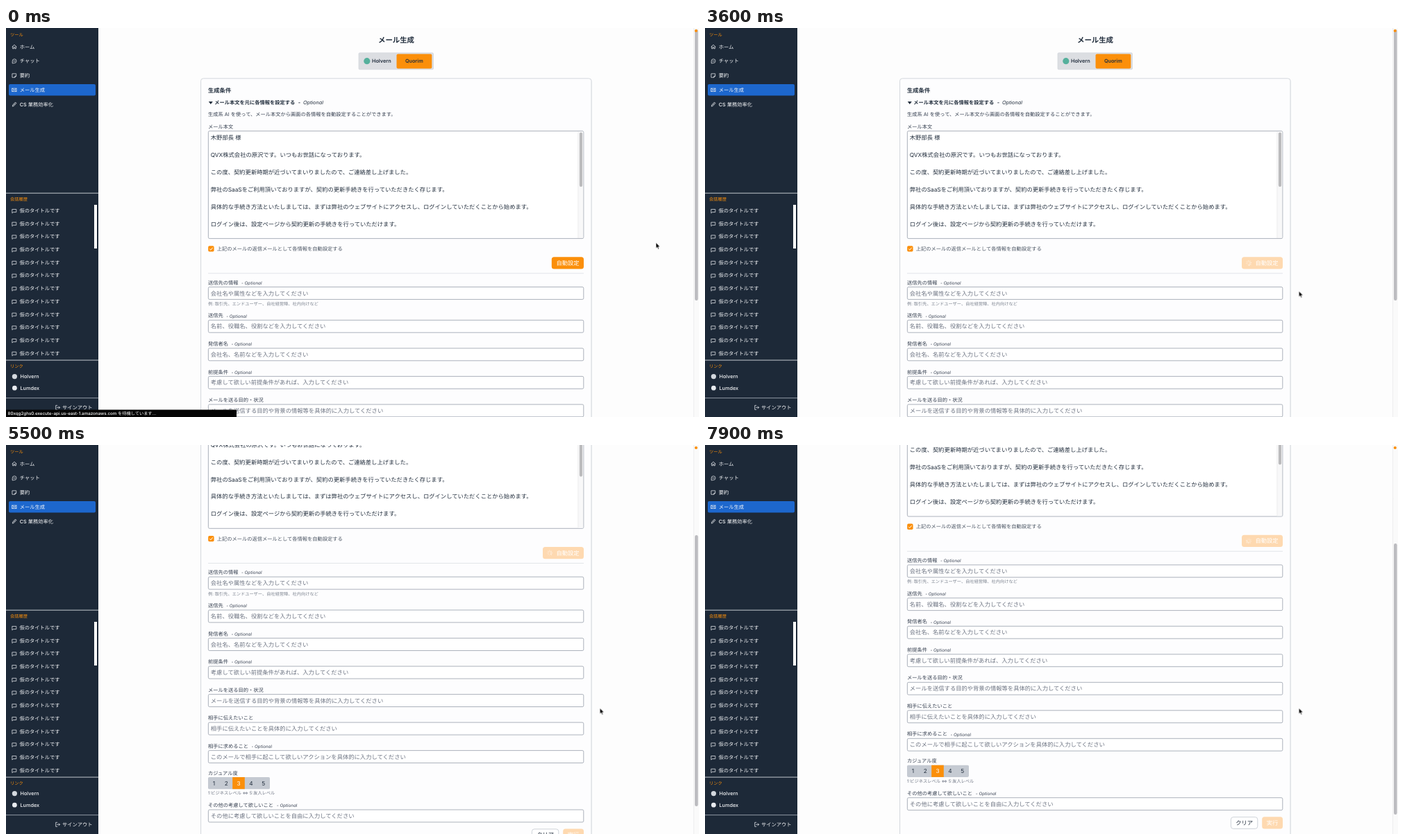
An HTML page that plays this animation: 998x561 px, repeating every 8000 ms.

```html
<!DOCTYPE html>
<html lang="ja">
<head>
<meta charset="utf-8">
<title>メール生成</title>
<style>
  @property --y { syntax: "<number>"; inherits: true; initial-value: 0; }

  html, body { margin: 0; width: 100%; height: 100%; overflow: hidden; background: #fdfdfd; }
  svg {
    display: block; width: 998px; height: 561px;
    font-family: Inter, "Noto Sans CJK JP", "Noto Sans CJK", sans-serif;
    text-rendering: geometricPrecision;
    animation: scroll 8s -.02s infinite;
  }
  text { white-space: pre; }
  .icon { fill: none; stroke: #e8ebef; stroke-width: .75; stroke-linejoin: round; stroke-linecap: round; }
  #page { transform: translateY(calc(var(--y) * -1px)); }
  #thumb { transform: translateY(calc(var(--y) * .698px)); }
  #status { animation: status 8s -.02s step-end infinite; }
  #ready { animation: ready 8s -.02s step-end infinite; }
  #busy { animation: busy 8s -.02s step-end infinite; }
  #spinner { transform-origin: 783px 339px; animation: spin 1s -.02s steps(10) infinite; }
  #cursor { animation: cursor 8s -.02s infinite; }

  @keyframes scroll {
    0% { --y: 0; }
    45% { --y: 0; animation-timing-function: steps(5); }
    51.25% { --y: 65; animation-timing-function: steps(12); }
    66.25% { --y: 183.3; }
    80% { --y: 183.3; animation-timing-function: steps(2); }
    82.5%, 100% { --y: 200.6; }
  }
  @keyframes status { 0% { visibility: visible; } 6.25%, 100% { visibility: hidden; } }
  @keyframes ready { 0% { visibility: visible; } 32.5%, 100% { visibility: hidden; } }
  @keyframes busy { 0% { visibility: hidden; } 32.5%, 100% { visibility: visible; } }
  @keyframes spin { to { transform: rotate(360deg); } }
  @keyframes cursor {
    0% { transform: translate(936px, 309.5px); }
    3.75% { transform: translate(936px, 309.5px); animation-timing-function: steps(2); }
    6.25% { transform: translate(820px, 285px); animation-timing-function: steps(3); }
    10% { transform: translate(450px, 200px); animation-timing-function: steps(3); }
    13.75% { transform: translate(284.5px, 161px); }
    17.5% { transform: translate(284.5px, 161px); animation-timing-function: steps(3); }
    21.25% { transform: translate(430px, 220px); animation-timing-function: steps(3); }
    25% { transform: translate(720px, 318px); animation-timing-function: steps(3); }
    28.75% { transform: translate(807px, 341px); }
    33.75% { transform: translate(807px, 341px); animation-timing-function: steps(2); }
    36.25% { transform: translate(840px, 368px); animation-timing-function: steps(2); }
    38.75% { transform: translate(854px, 380px); }
    45%, 100% { transform: translate(855.3px, 379.5px); }
  }
</style>
</head>
<body>
<svg id="stage" viewBox="0 0 998 561"></svg>
<script>
const ORANGE = '#fb8f0a', PALE = '#fed9b0', INK = '#232f3e', LABEL = '#374151',
      GRAY = '#6b7280', EDGE = '#a3aab5', WHITE = '#f6f7f9';
const BIG = 10.4, BODY = 8.3, TEXT = 7.26, SMALL = 6.23;

// Text is placed by the vertical middle of its line.
const text = (x, y, size, str, fill = INK, extra = '') =>
  `<text x="${x}" y="${y + size * .37}" font-size="${size}" fill="${fill}" ${extra}>${str}</text>`;
const rect = (x, y, w, h, fill, r = 0, extra = '') =>
  `<rect x="${x}" y="${y}" width="${w}" height="${h}" rx="${r}" fill="${fill}" ${extra}/>`;
const line = (x1, x2, y, color) => rect(x1, y, x2 - x1, .9, color);
const icon = (x, y, d) => `<path class="icon" transform="translate(${x} ${y})" d="${d}"/>`;
const dot = (x, y, r, fill) => `<circle cx="${x}" cy="${y}" r="${r}" fill="${fill}"/>`;
const MEDIUM = 'font-weight="500"', BOLD = 'font-weight="700"', ITALIC = 'font-style="italic"';
const CENTER = 'text-anchor="middle"';

function sidebar() {
  const menu = [
    ['ホーム', 'M-3 0L0-2.8 3 0M-2.3-.5V2.8H-.8V.8H.8V2.8H2.3V-.5'],
    ['チャット', 'M-2.8 2.8V0A2.9 2.9 0 1 1 0 2.8ZM-1.2 0H1.2'],
    ['要約', 'M-2.7-2.7H2.7V.8L.8 2.7H-2.7ZM.8 2.7V.8H2.7'],
    ['メール生成', 'M-3-2.2H3V2.2H-3ZL0 .4 3-2.2M-3 2.2L-.8 0M3 2.2L.8 0'],
    ['CS 業務効率化', 'M-2.6 2.6L-2.1.5 1-2.6Q2-3 2.6-2.2 3-1.5 2.4-.9L-.6 2.1ZM-1 1L1.2-1.2']
  ];
  const bubble = 'M-2.8-2.3H2.8V1.8H-1.4L-2.8 3Z';
  let s = rect(0, 0, 133, 561, '#1d2938') + text(6, 10, SMALL, 'ツール', ORANGE, MEDIUM)
    + rect(4, 81, 125, 16.6, '#1d67cd', 2);
  menu.forEach(([name, d], i) => {
    const y = 27 + i * 20.78;
    s += icon(12, y, d) + text(19.8, y, TEXT, name, WHITE, MEDIUM);
  });
  s += line(0, 133, 237.7, '#d5d9de') + text(6, 246.3, SMALL, '会話履歴', ORANGE, MEDIUM);
  for (let i = 0; i < 12; i++) {
    const y = 263.3 + i * 18.7;
    s += icon(12, y + .5, bubble) + text(19.6, y, TEXT, '仮のタイトルです', WHITE, MEDIUM);
  }
  return s + rect(127, 255, 4, 63, '#fff')
    + line(0, 133, 478.6, '#d5d9de') + text(6, 487.3, SMALL, 'リンク', ORANGE, MEDIUM)
    + dot(12.4, 502.6, 3.6, '#d3d8de') + text(20.5, 502.5, TEXT, 'Holvern', WHITE, MEDIUM)
    + dot(12.4, 519.2, 3.4, '#e8ebef') + text(20.5, 519, TEXT, 'Lumdex', WHITE, MEDIUM)
    + line(0, 133, 533.2, '#9aa2ad')
    + icon(74.5, 547.3, 'M-.8-3H-2.8V3H-.8M-1 0H3M1.5-1.5L3 0 1.5 1.5')
    + text(81, 547.2, TEXT, 'サインアウト', WHITE, MEDIUM);
}

function field(y, label, hint, optional) {
  return text(291, y, TEXT, label, LABEL)
    + (optional ? text(291 + label.length * TEXT + 4.4, y + .5, SMALL, '- Optional', LABEL, ITALIC) : '')
    + rect(291.4, y + 6.5, 540.4, 17.9, '#fff', 1.8, `stroke="${EDGE}" stroke-width=".9"`)
    + text(294.8, y + 15.5, BODY, hint, GRAY);
}

function mailBox() {
  const rows = [
    '木野部長 様',
    'QVX株式会社の原沢です。いつもお世話になっております。',
    'この度、契約更新時期が近づいてまいりましたので、ご連絡差し上げました。',
    '弊社のSaaSをご利用頂いておりますが、契約の更新手続きを行っていただきたく存じます。',
    '具体的な手続き方法といたしましては、まずは弊社のウェブサイトにアクセスし、ログインしていただくことから始めます。',
    'ログイン後は、設定ページから契約更新の手続きを行っていただけます。'
  ];
  return rect(291.4, 148.6, 540.4, 155, '#fff', 1.8, `stroke="${EDGE}" stroke-width=".9"`)
    + rect(823.8, 149.2, 7.4, 153.8, '#f8f8f9') + rect(823.6, 149.2, .6, 153.8, '#e3e4e6')
    + rect(825.9, 150.5, 4.2, 78.5, '#bbbbbd', 2.1)
    + rows.map((row, i) => text(294.8, 158.1 + i * 24.9, BODY, row)).join('');
}

function autoButton() {
  let spokes = '';
  for (let i = 0; i < 8; i++)
    spokes += `<path d="M783 337.2V335.2" stroke="#fff" stroke-width=".8" stroke-linecap="round" `
      + `opacity="${.3 + i * .1}" transform="rotate(${i * 45} 783 339)"/>`;
  const name = text(809, 338.9, BODY, '自動設定', '#fff', CENTER + ' ' + MEDIUM);
  return `<g id="ready">${rect(785.8, 330.3, 46.2, 17.2, ORANGE, 3.5)}${name}</g>`
    + `<g id="busy">${rect(773, 330.3, 59, 17.2, PALE, 3.5)}${name}<g id="spinner">${spokes}</g></g>`;
}

function level() {
  let s = rect(291, 662.3, 89, 17.2, '#c5cad2', 1.8) + rect(326.2, 662.3, 17.6, 17.2, ORANGE);
  for (let i = 0; i < 5; i++)
    s += text(299.5 + i * 17.8, 671, BODY, i + 1, i === 2 ? '#fff' : INK, CENTER);
  return text(291, 656.4, TEXT, 'カジュアル度', LABEL) + s
    + text(291, 685.5, SMALL, '1:ビジネスレベル ⇔ 5:友人レベル', GRAY);
}

function page() {
  return text(562, 17, BIG, 'メール生成', INK, CENTER + ' ' + BOLD)
    + rect(508, 35.8, 107.5, 24, '#dcdee2', 1.5, 'stroke="#cfd2d8" stroke-width=".6"')
    + rect(562.5, 37.4, 50.8, 21, ORANGE, 2)
    + dot(519.8, 47.7, 4.6, '#55b09c')
    + text(527, 47.7, TEXT, 'Holvern', INK, 'font-weight="600"')
    + text(587.8, 47.7, TEXT, 'Quorim', INK, CENTER + ' font-weight="600"')
    + rect(280.4, 73.4, 563.2, 900, '#e9ebee', 3.5)
    + rect(280.6, 72.8, 562.4, 900, '#fdfdfe', 3.5, 'stroke="#d0d4da" stroke-width=".9"')
    + text(291, 90, BODY, '生成条件', INK, BOLD)
    + '<path d="M291.8 105.9H297.8L294.8 110Z" fill="#232f3e"/>'
    + text(300.3, 107.5, TEXT, 'メール本文を元に各情報を設定する', INK, BOLD)
    + text(420.8, 107.5, TEXT, '-', INK, BOLD)
    + text(428, 107.5, TEXT, 'Optional', INK, ITALIC)
    + text(291, 124.3, TEXT, '生成系 AI を使って、メール本文から画面の各情報を自動設定することができます。', LABEL)
    + text(291, 142.2, TEXT, 'メール本文', LABEL)
    + mailBox()
    + rect(291.2, 314.2, 8.4, 8.4, ORANGE, 1.8)
    + '<path d="M293.2 318.6L294.8 320.2 297.7 316.7" fill="none" stroke="#fff" stroke-width="1"/>'
    + text(303.8, 318.4, TEXT, '上記のメールの返信メールとして各情報を自動設定する', '#4b5563')
    + autoButton()
    + line(291, 832, 353.4, '#dfe2e7')
    + field(367, '送信先の情報', '会社名や属性などを入力してください', true)
    + text(291, 397.6, SMALL, '例: 取引先、エンドユーザー、自社経営陣、社内向けなど', '#7d8490')
    + field(414.8, '送信先', '名前、役職名、役割などを入力してください', true)
    + field(455.4, '発信者名', '会社名、名前などを入力してください', true)
    + field(495.9, '前提条件', '考慮して欲しい前提条件があれば、入力してください', true)
    + field(536.4, 'メールを送る目的・状況', 'メールを送信する目的や背景の情報等を具体的に入力してください')
    + field(576.9, '相手に伝えたいこと', '相手に伝えたいことを具体的に入力してください')
    + field(617.4, '相手に求めること', 'このメールで相手に起こして欲しいアクションを具体的に入力してください', true)
    + level()
    + field(702.8, 'その他の考慮して欲しいこと', 'その他に考慮して欲しいことを自由に入力してください', true)
    + rect(757.4, 737.2, 38.4, 16.8, '#fff', 3.5, 'stroke="#c3c8d0" stroke-width=".8"')
    + text(776.6, 745.6, BODY, 'クリア', INK, CENTER)
    + rect(802.2, 736.9, 29.8, 17.2, PALE, 3.5)
    + text(817.1, 745.6, BODY, '実行', '#fff', CENTER + ' ' + MEDIUM);
}

document.getElementById('stage').innerHTML =
  `<g id="page">${page()}</g>`
  + rect(990.2, 0, 7.8, 561, '#fafafa') + rect(990, 0, .7, 561, '#e9e9ea')
  + `<g id="thumb">${rect(992, 2, 4.6, 391, '#bcbcc0', 2.3)}</g>`
  + dot(993.8, 4, 2.1, ORANGE)
  + sidebar()
  + `<g id="status">${rect(0, 550.6, 332, 11, '#050505', 1)}${
      text(2.5, 555.6, SMALL, '80xqg2ghs0.execute-api.us-east-1.amazonaws.com を待機しています...', '#fff', MEDIUM)}</g>`
  + '<path id="cursor" d="M0 0V8.3L1.9 6.6 3.1 9.4 4.5 8.8 3.3 6.1H5.9Z" fill="#000" stroke="#fff" stroke-width=".7"/>';
</script>
</body>
</html>
```
